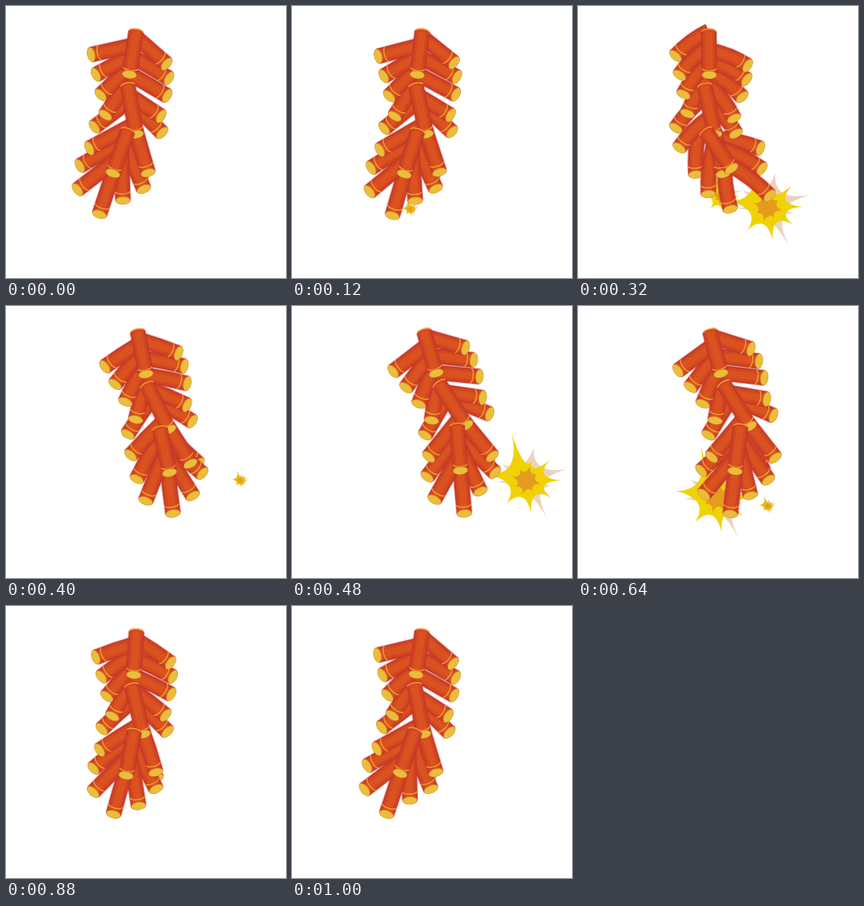
An HTML page with a canvas for the animation above (1040 ms loop, 350 by 340 pixels).

```html
<!DOCTYPE html>
<html lang="en">
<head>
<meta charset="utf-8">
<title>Firecrackers</title>
<style>
  html, body { margin: 0; width: 100%; height: 100%; overflow: hidden; background: #fff; }
  canvas { display: block; width: 350px; height: 340px; }
</style>
</head>
<body>
<canvas id="stage" width="350" height="340"></canvas>
<script>
const ctx = document.getElementById('stage').getContext('2d');
const LOOP = 1040, STEP = 40;

const mix = (a, b, k) => a + (b - a) * k;
const range = (n, f) => Array.from({ length: n }, (_, i) => f(i));
const wave = (t, peak, turns = 1) => Math.cos(2 * Math.PI * turns * (t - peak) / LOOP);
const bump = (t, peak) => Math.abs(t - peak) < 120 ? Math.cos((t - peak) * Math.PI / 240) ** 2 : 0;

// Three stiff bunches hang from each other. Tips are local to the bunch's
// top, with y along its front tube, and listed back to front.
const OPEN = [[36, 52], [43, 62], [23, 84], [1, 110], [-42, 61], [-35, 90]];
const CURLED = [[44, 56], [31, 78], [20, 111], [-30, 97], [-41, 37], [-42, 66]];
const BUNCHES = [
  {
    front: 54, reach: 52,
    angle: (t, curl) => 4 + 13 * wave(t, 540) - 6.5 * curl,
    tips: curl => [
      ...range(4, i => [44 + 8 * i - 2.3 * i * i + curl * (4 - 7 * i), 34 + 15 * i + 2.3 * i * i + 9 * curl]),
      ...range(4, i => [-51 + 9.7 * i + curl * (9 - 5 * i), 37 + 24 * i - 7 * curl])
    ].reverse()
  },
  {
    front: 62, reach: 56,
    angle: (t, curl) => 22 + 12 * wave(t, 540) - 13 * curl,
    tips: curl => [
      ...range(2, i => [32 - 26 * i - 6 * curl, 66 + 46 * i]).reverse(),
      ...range(2, i => [-50 - 11 * i + curl * (4 + 10 * i), 44 + 25 * i])
    ]
  },
  {
    front: 56, reach: 64,
    angle: (t, curl) => -10.5 + 12 * wave(t, 450) + 3 * wave(t, -60, 2) + 37 * curl,
    tips: curl => OPEN.map(([x, y], i) => [mix(x, CURLED[i][0], curl), mix(y, CURLED[i][1], curl)])
  }
];

// Bursts grow from a spark to full size, then vanish.
const BURSTS = [
  { from: 3, steps: 3, x: 148, y: 254, full: 1.9 },
  { from: 5, steps: 4, x: 237, y: 251, full: 1.05 },
  { from: 7, steps: 2, x: 179, y: 238, full: .55 },
  { from: 10, steps: 3, x: 293, y: 218, full: 1.02 },
  { from: 14, steps: 3, x: 173, y: 239, full: 1.1 },
  { from: 16, steps: 5, x: 237, y: 250, full: 1 },
  { from: 18, steps: 4, x: 149, y: 253, full: 1.9 }
];
const YELLOW = [[-18, -57], [6, -24], [29, -25], [43, 0], [30, 21], [6, 40], [-24, 28], [-46, -7]];
const BEIGE = [[-30, -20], [9, -40], [49, -14], [30, 8], [25, 46], [0, 24], [-20, 25], [-36, 2]];
const ORANGE = range(8, i => {
  const a = i * Math.PI / 4 + .25, r = i % 2 ? 15 : 18;
  return [r * Math.cos(a), r * Math.sin(a)];
});

function drawTube(a, b, bend, front) {
  const dx = b[0] - a[0], dy = b[1] - a[1], len = Math.hypot(dx, dy);
  const c = [(a[0] + b[0]) / 2 + bend * dy / len, (a[1] + b[1]) / 2 - bend * dx / len];
  const oval = (y, rx, ry, color) => {
    ctx.beginPath();
    ctx.ellipse(0, y, rx, ry, 0, 0, 7);
    ctx.fillStyle = color;
    ctx.fill();
  };
  const ring = (y, from) => {
    ctx.beginPath();
    ctx.ellipse(0, y, 9, 3.2, 0, from, from + Math.PI);
    ctx.strokeStyle = '#eda832';
    ctx.lineWidth = 1.3;
    ctx.stroke();
  };
  const local = (p, q, at, draw) => {
    ctx.save();
    ctx.translate(at[0], at[1]);
    ctx.rotate(Math.atan2(q[1] - p[1], q[0] - p[0]) - Math.PI / 2);
    draw();
    ctx.restore();
  };
  if (front) local(a, c, a, () => oval(0, 9.5, 4, '#d4481f'));
  ctx.beginPath();
  ctx.moveTo(a[0], a[1]);
  ctx.quadraticCurveTo(c[0], c[1], b[0], b[1]);
  [[21, 'rgba(190,50,70,.3)'], [19, '#c63a26'], [15, '#d24720'], [9, '#da5220']].forEach(([w, color]) => {
    ctx.lineWidth = w;
    ctx.strokeStyle = color;
    ctx.stroke();
  });
  if (front) local(a, c, a, () => ring(0, Math.PI));
  local(c, b, b, () => {
    ring(front ? -8 : -11, 0);
    oval(0, 9.6, 5.2, '#d9742a');
    oval(.3, 8.9, 4.6, '#e9be3a');
  });
}

function drawStar(tips, color, rate) {
  ctx.beginPath();
  ctx.moveTo(...tips[0]);
  tips.forEach((p, i) => {
    const q = tips[(i + 1) % tips.length];
    ctx.quadraticCurveTo((p[0] + q[0]) * rate, (p[1] + q[1]) * rate, ...q);
  });
  ctx.fillStyle = color;
  ctx.fill();
}

function drawBurst({ from, steps, x, y, full }, step) {
  const k = (step - from) / (steps - 1);
  if (k < 0 || k > 1) return;
  const size = mix(.23, full, k * k);
  ctx.save();
  ctx.translate(x, y);
  ctx.scale(size, size * (full > 1.5 ? mix(1, .9, k) : 1));
  drawStar(BEIGE, '#ecd2bc', .12);
  drawStar(YELLOW, k ? '#f0d204' : '#e6bd12', .11);
  drawStar(ORANGE, '#e59c1e', .22);
  ctx.restore();
}

// Turns a bunch's own coordinates into stage coordinates.
function frameAt([ox, oy], degrees) {
  const s = Math.sin(degrees * Math.PI / 180), c = Math.cos(degrees * Math.PI / 180);
  return (x, y) => [ox + x * c + y * s, oy - x * s + y * c];
}

function hang(t, curl) {
  const turn = BUNCHES.map(b => b.angle(t, curl));
  const upper = frameAt([163.5 + .1 * turn[0], 32], turn[0]);
  const middle = frameAt(upper(-6 * curl, 68), turn[1]);
  const lower = frameAt(middle(-10, 56), turn[2]);
  return [upper, middle, lower];
}

function render(now) {
  const step = Math.floor((now % LOOP) / STEP), t = step * STEP;
  const curl = bump(t, 320) + bump(t, 800);
  const frames = hang(t, curl);

  ctx.fillStyle = '#fff';
  ctx.fillRect(0, 0, 350, 340);
  BURSTS.forEach(b => drawBurst(b, step));

  [2, 1, 0].forEach(n => {
    const { tips, reach } = BUNCHES[n];
    tips(curl).forEach(([x, y]) => {
      const rise = Math.sqrt(Math.max(400, reach * reach - x * x));
      drawTube(frames[n](0, y - rise), frames[n](x, y), Math.sign(x) * 5 * curl, false);
    });
  });
  [1, 0, 2].forEach(n => drawTube(frames[n](0, 0), frames[n](0, BUNCHES[n].front), 0, true));
}

const start = performance.now();
function tick() {
  render(performance.now() - start);
  requestAnimationFrame(tick);
}
tick();
</script>
</body>
</html>
```
